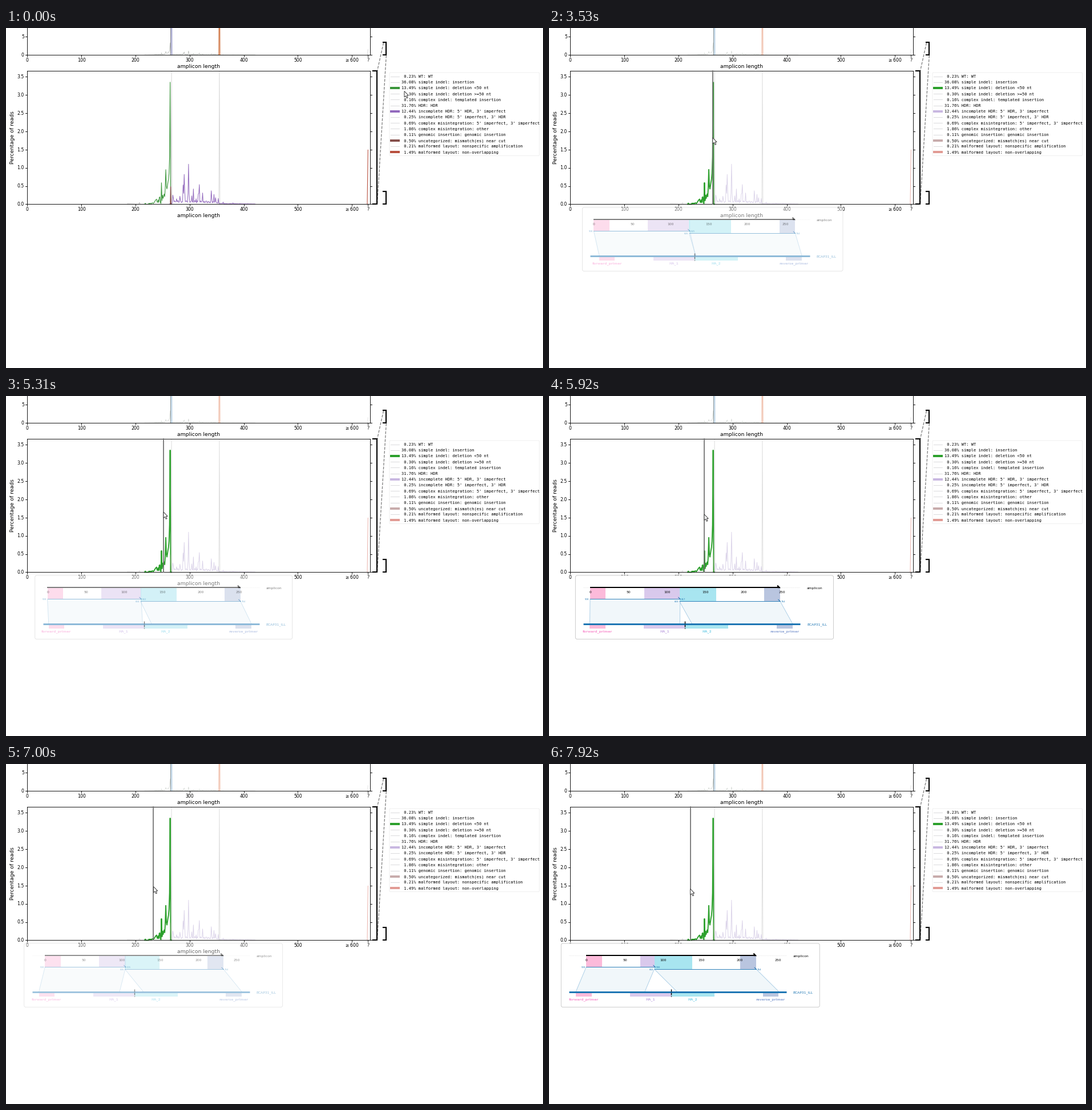
Animation of 941 by 595 pixels, one loop 8 s. Source, as a matplotlib script:

```python
import numpy as np
import matplotlib.pyplot as plt
from matplotlib.animation import FuncAnimation
from matplotlib.patches import FancyBboxPatch, Polygon, Rectangle

W, H, DPI = 941, 595, 100
PT = 72 / DPI                       # points per pixel
INTERVAL, FRAMES = 50, 160

X0, NT = 37.2, 0.9485               # x of length 0, pixels per nt
LOW, HIGH = 308.4, 47.2             # baselines of the two plots
UNIT = 63.74                        # pixels per percent in the lower plot
LEFT, RIGHT, TOP = 37, 638, 75.3

fig = plt.figure(figsize=(W / DPI, H / DPI), dpi=DPI, facecolor="white")
ax = fig.add_axes([0, 0, 1, 1])
ax.set_xlim(0, W)
ax.set_ylim(H, 0)
ax.axis("off")


def line(xs, ys, color="black", px=0.9, z=2, **kw):
    art, = ax.plot(xs, ys, color=color, lw=px * PT, zorder=z, **kw)
    return art


def label(x, y, s, px, ha="center", z=3, **kw):
    """Text whose capitals are centred on y."""
    return ax.text(x, y + 0.365 * px, s, fontsize=px * PT, ha=ha,
                   va="baseline", zorder=z, **kw)


# ---------- axes ----------
def x_axis(base):
    line([LEFT, RIGHT], [base, base], z=5)
    for n in range(0, 601, 100):
        x = X0 + NT * n
        line([x, x], [base, base + 3])
        label(x, base + 8.6, r"$\geq$600" if n == 600 else str(n), 7.73)
    line([634.3] * 2, [base, base + 3])
    label(634.3, base + 8.6, "?", 7.73)
    label(337.5, base + 19.6, "amplicon length", 9.28)


def y_tick(y, s):
    line([LEFT - 3, LEFT], [y, y])
    line([RIGHT, RIGHT + 3], [y, y])
    label(LEFT - 5.2, y, s, 7.73, ha="right")


x_axis(HIGH)
x_axis(LOW)
for x in (LEFT, RIGHT):
    line([x, x], [-5, HIGH], z=5)
    line([x, x], [TOP, LOW], z=5)
line([LEFT, RIGHT], [TOP, TOP], z=5)
y_tick(HIGH, "0")
y_tick(HIGH - 5 * UNIT / 10, "5")
for k in range(8):
    y_tick(LOW - k * UNIT / 2, f"{k / 2:.1f}")
ax.text(11.8, 192, "Percentage of reads", fontsize=9.28 * PT, rotation=90,
        ha="center", va="center")

# ---------- zoom brackets ----------
for xs in ([661.5, 650.5], [666.3, 650.5]):
    ys = [26, TOP] if xs[0] < 665 else [48, LOW]
    line(xs, ys, "#808080", 1.3, linestyle=(0, (3.7, 1.6)))
for x, arm, y1, y2 in ((666, 5, 25, 47), (650, 7, 75, 308), (666, 5, 286, 308)):
    line([x - arm, x, x, x - arm], [y1, y1, y2, y2], px=2.1, z=6,
         solid_joinstyle="miter")

# ---------- data ----------
rng = np.random.default_rng(4)

del_n = np.arange(217, 267)
del_h = np.interp(del_n, [
    217, 218, 219, 224, 225, 226, 228, 229, 231, 233, 235, 237, 239, 240, 241,
    242, 243, 244, 245, 246, 247, 248, 249, 250, 251, 252, 253, 254, 255, 256,
    257, 258, 259, 260, 261, 262, 263, 264, 265], [
    0, .03, 0, 0, .03, .01, .03, .01, .04, .02, .06, .11, .14, .06, .05,
    .12, .05, .19, .2, .05, .02, .59, .1, .25, .16, .22, .28, .21, .45, .95,
    .5, .42, .5, .6, .68, .85, 1.3, 3.35, 0])

hdr_n = np.arange(262, 422)
env = np.interp(hdr_n, [262, 267, 269, 300, 350, 356, 366, 420],
                [0, .02, .1, .1, .09, .03, .02, .008])
hdr_h = env * rng.uniform(0.35, 1, hdr_n.size)
peaks = {269: .25, 270: .17, 276: .15, 282: .22, 283: .12, 288: .53, 289: .3,
         290: .82, 291: .35, 297: .3, 298: 1.1, 299: .3, 304: .23, 307: .42,
         312: .15, 316: .28, 317: .3, 318: .54, 324: .31, 340: .37, 341: .15,
         345: .27, 348: .18, 353: .16, 362: .06, 380: .04}
for n, h in peaks.items():
    hdr_h[n - 262] = h


def curve(n, h, color, px, z, base=LOW, unit=UNIT):
    ys = base - unit * np.asarray(h)
    if base == LOW:
        ys = np.maximum(ys, TOP)
    return line(X0 + NT * np.asarray(n), ys, color, px, z)


GREEN, PURPLE = ("#3b963b", "#2ca02c"), ("#9269bd", "#d9d1e8")
BROWN, RED = ("#86504c", "#d8c4c2"), ("#b8503f", "#e8aaa2")
GREY = ("#d6d6d6", "#dcdcdc")
themed = []                         # artist, colours, widths


def both(art, colors, widths):
    themed.append((art, colors, [w * PT for w in widths]))


spike = [0, 1, 0]
for n, h in ((266.6, 36), (355, 31.8)):
    both(curve([n - 1, n, n + 1], [0, h, 0], GREY[0], 0.9, 2), GREY, (0.9, 0.9))
both(curve([185, 206, 207, 208, 209], [.01, 0, .05, .02, 0], GREY[0], 0.8, 2),
     ("#b5b5b5", "#dcdcdc"), (0.8, 0.8))
both(curve(hdr_n, hdr_h, PURPLE[0], 1, 3), PURPLE, (1, 0.9))
both(curve(del_n, del_h, GREEN[0], 1, 4), GREEN, (1.1, 1.9))
both(curve([264.3, 265, 265.7], [0, .48, 0], BROWN[0], 1.2, 4),
     (BROWN[0], "#5f9a50"), (1.3, 0.5))
both(line([633, 634.3], [LOW, LOW - 1.49 * UNIT], RED[0], 1), RED, (1.1, 0.9))

SMALL = UNIT / 10
for n, h in ((del_n, del_h), (hdr_n, hdr_h)):
    both(curve(n, h, "#bcc0bc", 0.8, 2, HIGH, SMALL), ("#b9bdb9", "#d6dad6"),
         (0.8, 0.8))
both(line([633.5, 634.3], [HIGH, HIGH - 9.5]), ("#cccccc", "#dddddd"),
     (0.8, 0.8))
both(line([288.5] * 2, [-5, HIGH], z=3), ("#8d8d92", "#8f9a9c"), (1, 1))
both(curve([265.6, 266.6, 267.6], np.multiply(spike, 36), "b", 1, 2, HIGH, SMALL),
     ("#9a9ccc", "#b5d0e6"), (1.1, 1.1))
both(curve([354, 355, 356], np.multiply(spike, 31.8), "r", 1, 3, HIGH, SMALL),
     ("#cf7340", "#efb9a3"), (1.3, 1.2))

# ---------- legend ----------
rows = [
    (0.23, "WT: WT"), (36.08, "simple indel: insertion"),
    (13.49, "simple indel: deletion <50 nt"),
    (0.30, "simple indel: deletion >=50 nt"),
    (0.16, "complex indel: templated insertion"), (31.76, "HDR: HDR"),
    (12.44, "incomplete HDR: 5' HDR, 3' imperfect"),
    (0.25, "incomplete HDR: 5' imperfect, 3' HDR"),
    (0.69, "complex misintegration: 5' imperfect, 3' imperfect"),
    (1.86, "complex misintegration: other"),
    (0.11, "genomic insertion: genomic insertion"),
    (0.50, "uncategorized: mismatch(es) near cut"),
    (0.21, "malformed layout: nonspecific amplification"),
    (1.49, "malformed layout: non-overlapping")]
bold = {2: GREEN, 6: (PURPLE[0], "#c9b8e1"), 11: (BROWN[0], "#c8acac"),
        13: (RED[0], "#e29b94")}
ax.add_patch(FancyBboxPatch((673.5, 79.5), 259.5, 142.5, fc="white",
             boxstyle="round,pad=1.5", ec="#ececec", lw=0.8 * PT))
for i, (pct, name) in enumerate(rows):
    y = 84.5 + 10.2 * i
    label(693.3, y, f"{pct:5.2f}% {name}", 6.96, ha="left",
          family="DejaVu Sans Mono")
    if i in bold:
        both(line([672.8, 690.2], [y, y], px=4, solid_capstyle="butt"),
             bold[i], (4, 4))
    else:
        line([674, 689], [y, y], "#d8d8da", 0.9)

# ---------- motion ----------
bursts = [(500, 800, 5), (1030, 1120, 2), (1270, 1270, 1), (1670, 1670, 1),
          (1820, 1820, 1), (2290, 3060, 11), (3140, 3870, 10),
          (4460, 5230, 11), (5310, 5920, 9), (6080, 6850, 11),
          (6950, 7690, 11), (7770, 7920, 3)]
steps = np.concatenate([[0]] + [np.linspace(*b) for b in bursts])

path = np.array([
    (0, 698, 110.5), (420, 698, 110.5), (800, 682, 105.5), (1030, 681, 105),
    (1270, 679.5, 104), (1670, 675.5, 98), (1820, 677, 104),
    (2290, 661.5, 114.5), (3060, 329, 181), (3140, 310, 186),
    (3300, 287.5, 191), (3870, 285, 194.5), (4460, 284.7, 195.5),
    (5230, 283, 200), (5310, 276, 203), (5920, 272, 207), (6080, 271, 208),
    (6540, 264, 211.5), (6850, 260.7, 213.5), (6950, 260, 214),
    (7380, 251, 217), (7690, 250, 217.5), (7770, 248, 218),
    (7920, 247.6, 218.5)])
fade = np.array([
    (3140, .1), (3870, 1), (4380, 1), (4460, .86), (4850, .25), (5310, .5),
    (5920, 1), (6080, .9), (6540, .17), (6850, .55), (6950, .5), (7380, .05),
    (7690, .35), (7770, .5), (7920, 1)])

ARROW = np.array([(0, 0), (0, 10.5), (2.4, 8.3), (4.2, 12.3), (6, 11.5),
                  (4.3, 7.6), (7.3, 7.6)])
cursor = ax.add_patch(Polygon(ARROW, fc="white", ec="#3a3a3a", lw=0.95 * PT,
                              zorder=20))
guide = line([0, 0], [TOP, LOW], "#6e6e6e", 1.7, z=7)

# ---------- tooltip ----------
SCALE, FULL, CUT = 1.3425, 264.5, 124.4
BLUE = "#1f77b4"
features = [("forward_primer", 0, 20.3, "#fcbada", "#f99ad3"),
            ("HA_1", 70.7, CUT, "#d9c9ec", "#c9b2e6"),
            ("HA_2", CUT, 181, "#a8e5f0", "#82d4ea"),
            ("reverse_primer", 243.8, FULL, "#b9c5df", "#97acd9")]
tip = []


def draw_tip(x, n, a):
    """Tooltip for an amplicon of n nt, centred on x with opacity a."""
    pad = np.interp(n, [245, 252, 262], [193, 191, 196.5])
    c = x - (260 - pad) / 2
    left = c - pad
    amp = c - n * SCALE / 2
    gene = c - CUT * SCALE
    end = np.interp(n, [222, 225, 239, 252, 261],
                    [90, 104, 106.5, 122.5, 125.5])
    gap = FULL - n
    tail = amp + n * SCALE
    bar = (left + 14, c + 202)

    def patch(p):
        tip.append(ax.add_patch(p))

    def seg(xs, ys, color, px, **kw):
        tip.append(line(xs, ys, color, px, 12, alpha=a, **kw))

    def text(tx, ty, s, px=6.05, ha="center", **kw):
        tip.append(label(tx, ty, s, px, ha, 13, alpha=a, **kw))

    def block(x1, x2, y1, y2, color):
        patch(Rectangle((x1, y1), x2 - x1, y2 - y1, fc=color, lw=0, alpha=a,
                        zorder=11))

    patch(FancyBboxPatch((left + 3, 317), pad + 254, 105.5, fc="white",
                         boxstyle="round,pad=3", ec="#c8c8c8", lw=0.9 * PT,
                         alpha=a, zorder=9))

    # aligned parts on both sides of the deletion
    for p, q, off, y in ((0, end, 0, 355.3), (end - 1, n, gap, 359.2)):
        up1, up2 = amp + p * SCALE, amp + q * SCALE
        dn1, dn2 = gene + (p + off) * SCALE, gene + (q + off) * SCALE
        patch(Polygon([(up1, y), (up2, y), (dn2, 398), (dn1, 398)],
                      fc="#f1f7fa", lw=0, alpha=a, zorder=10))
        seg([up1, dn1], [y, 398], "#a9cde6", 0.9)
        seg([up2, dn2], [y, 398], "#a9cde6", 0.9)
        for _, lo, hi, color, _ in features:
            s, e = max(lo, p + off), min(hi, q + off)
            if e > s:
                block(amp + (s - off) * SCALE, amp + (e - off) * SCALE,
                      336, y, color)
        seg([up1, up2], [y, y], BLUE, 0.9)
        seg([up2 - 3.2, up2], [y - 3, y], BLUE, 1)
        text(up1 - 1.5, y, f"{500 + p + off:.0f}", 3.9, "right", color=BLUE)
        text(up2 + 1.5, y, f"{499.5 + q + off:.0f}", 3.9, "left", color=BLUE)

    seg(bar, [335.3] * 2, "#cccccc", 0.6, linestyle=":")
    seg([amp - 0.5, tail], [335.2] * 2, "black", 2, solid_capstyle="butt")
    patch(Polygon([(tail - 5.5, 331.3), (tail - 3.5, 331.3), (tail + 0.8, 336.2),
                   (tail - 4, 336.2)], fc="black", lw=0, alpha=a, zorder=12))
    for k in range(0, 251, 50):
        text(amp + k * SCALE + 0.5, 342.6, str(k))

    seg(bar, [399.4] * 2, BLUE, 3, solid_capstyle="butt")
    for name, lo, hi, color, ink in features:
        x1, x2 = gene + lo * SCALE, gene + hi * SCALE
        block(x1, x2, 400.5, 407.3, color)
        text((x1 + x2) / 2, 411.3, name, color=ink, weight="bold")
    seg([c, c], [393.5, 407], "black", 1.4, linestyle=(0, (3, 1.2)))
    text(c + 213.5, 335.4, "amplicon", ha="left")
    text(c + 213.5, 399.4, "BCAP31_ILL", ha="left", color=BLUE)


def update(i):
    t = i * INTERVAL + INTERVAL - 5
    t = steps[steps <= t].max()
    x, y = (np.interp(t, path[:, 0], path[:, k]) for k in (1, 2))
    cursor.set_xy(ARROW + (x, y))

    hover = int(t >= 1820)
    for art, colors, widths in themed:
        art.set_color(colors[hover])
        art.set_linewidth(widths[hover])

    while tip:
        tip.pop().remove()
    n = round((x - X0) / NT)
    over = t >= 3140 and n <= 265
    guide.set_visible(over)
    if over:
        gx = X0 + NT * n
        guide.set_xdata([gx, gx])
        draw_tip(gx, n, np.interp(t, fade[:, 0], fade[:, 1]))
    return []


anim = FuncAnimation(fig, update, frames=FRAMES, interval=INTERVAL, repeat=True)
plt.show()
```
